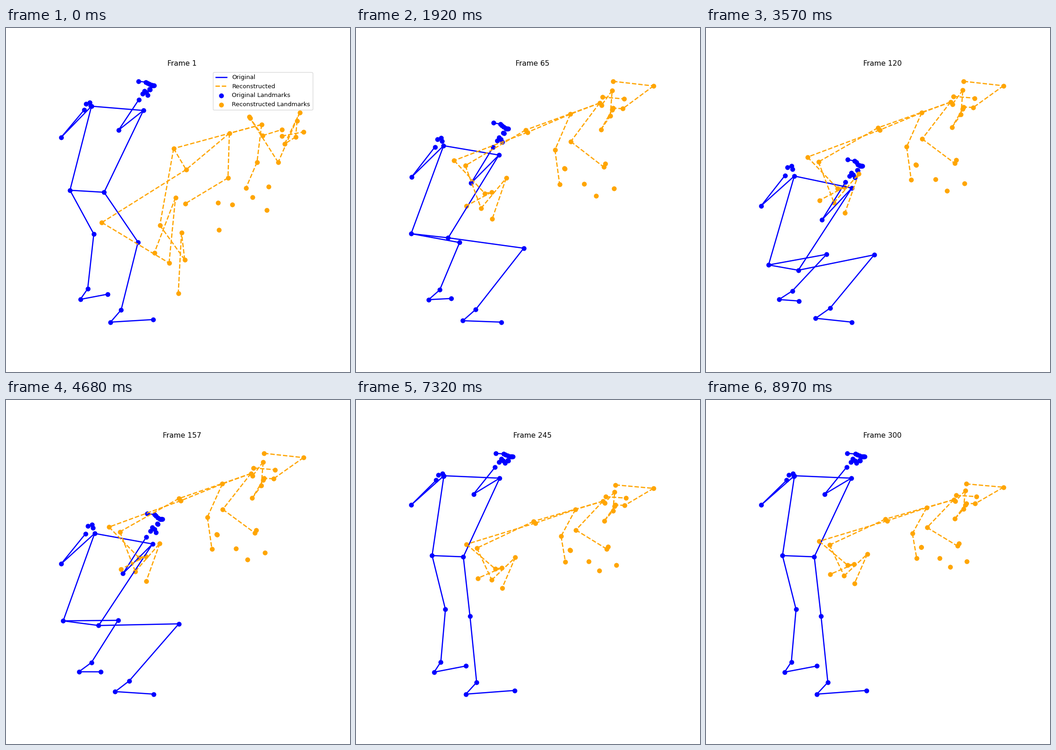
Animation, 748 px wide and 748 px high, one loop 9000 ms. Source, as a matplotlib script:

```python
import numpy as np
import matplotlib.pyplot as plt
from matplotlib.animation import FuncAnimation
from matplotlib.collections import LineCollection

FRAMES, STEP_MS = 300, 30
CENTER, ZOOM = np.array([340, 25]), 0.000714  # the blue figure slowly grows
SETTLE = 0.6                                  # rate at which orange calms down

# Squat depth over the loop: 0 upright, 1 lowest
TIMES = np.array([0, 64, 119, 156, 202, 244, 299])
DEPTH = np.array([0.19, 0.70, 1, 0.84, 0.385, 0, 0])

# Blue joints: upright, lowest
ARMS = {
    "shoulder_r": [(192, 80), (201, 306)], "shoulder_l": [(301, 86), (317, 331)],
    "elbow_r": [(128, 152), (134, 368)], "elbow_l": [(250, 125), (257, 397)],
    "wrist_r": [(177, 91), (182, 305)], "wrist_l": [(292, 59), (304, 319)],
    "hand_r": [(189, 75), (195, 285)], "hand_l": [(304, 39), (316, 299)],
}
LEGS = {
    "hip_r": [(169, 276), (149, 491)], "hip_l": [(230, 279), (209, 502)],
    "knee_r": [(195, 408), (266, 469)], "knee_l": [(243, 425), (362, 470)],
    "ankle_r": [(186, 537), (197, 545)], "ankle_l": [(256, 587), (273, 581)],
    "heel_r": [(173, 562), (170, 563)], "heel_l": [(235, 616), (244, 602)],
    "toe_r": [(235, 547), (210, 566)], "toe_l": [(330, 607), (317, 610)],
}
HEAD = {"ear": [(293, 25), (309, 272)], "nose": [(327, 33), (338, 285)]}
BODY = {**ARMS, **LEGS, **HEAD}

# Sideways swing of a joint halfway down; the arms all share one
SWING = {name: (4, 8) for name in ARMS}
SWING.update(hip_r=(-24, 0), hip_l=(-5, 0), knee_r=(-12, -7), knee_l=(48, 0))

# Small rigid parts: face points from ear to nose, fingers around a hand
FACE = np.array([(0, 0), (.47, .2), (.58, .45), (.7, .75), (.85, .95),
                 (1, 1), (.95, 1), (.9, 1), (.85, 1)])
MOUTH = np.array([(-9, 10), (-10, 9)])
FINGERS_R = np.array([(0, 0), (-8, 3), (2, 7)])
FINGERS_L = np.array([(0, 0), (-4, 7), (4, 4), (7, 10)])

# Orange pose once settled, and the loose one it starts from
SETTLED = np.array(
    [(560, 116), (647, 126), (581, 175), (560, 174), (558, 178),
     (534, 220), (554, 191), (558, 136), (535, 168)]                # face
    + [(537, 150), (584, 154)]                                      # mouth
    + [(531, 163), (469, 246), (540, 301)]                          # arm
    + [(372, 221), (242, 298), (276, 390), (330, 325), (300, 413)]  # leg
    + [(468, 187), (435, 264), (445, 338)]
    + [(376, 226), (218, 287), (284, 358), (299, 355), (244, 385)]
    + [(456, 305), (455, 304), (498, 337), (523, 363), (562, 347), (543, 294)], float)
LOOSE = np.array(
    [(633, 203), (630, 238), (606, 253), (639, 185), (592, 293),
     (531, 197), (529, 194), (558, 235), (600, 222)]
    + [(600, 236), (647, 227)]
    + [(556, 211), (546, 293), (522, 349)]
    + [(365, 263), (335, 430), (389, 505), (382, 446), (375, 578)]
    + [(486, 230), (483, 327), (390, 383)]
    + [(392, 309), (209, 424), (355, 512), (369, 370), (323, 490)]
    + [(461, 381), (463, 440), (492, 385), (536, 369), (567, 397), (571, 346)], float)
LOOSE = LOOSE * (0.979, 1.034) + (13.6, -49)


def chain(*ids):
    return list(zip(ids, ids[1:]))


# Order: face 0-8, mouth 9-10, right side 11-18, left side 19-26, fingers
EDGES = np.array(chain(*range(9)) + [(9, 10), (11, 19), (14, 22)]
                 + [e for s in (11, 19)
                    for e in chain(s, s + 1, s + 2) + chain(s, *range(s + 3, s + 8))])
LIMBS = [f"{joint}_{side}" for side in "rl"
         for joint in ("shoulder", "elbow", "wrist", "hip", "knee", "ankle", "heel", "toe")]

SLOPES = np.gradient(DEPTH, TIMES)
SLOPES[-2:] = 0


def depth(i):
    """Smooth curve through the depth keys."""
    k = min(np.searchsorted(TIMES, i, side="right") - 1, len(TIMES) - 2)
    h = TIMES[k + 1] - TIMES[k]
    u = (i - TIMES[k]) / h
    ease = u * u * (3 - 2 * u)
    return (DEPTH[k] + (DEPTH[k + 1] - DEPTH[k]) * ease
            + h * u * (1 - u) * ((1 - u) * SLOPES[k] - u * SLOPES[k + 1]))


def joint(name, d):
    up, low = np.array(BODY[name], float)
    return up + (low - up) * d + 4 * d * (1 - d) * np.array(SWING.get(name, (0, 0)))


def blue_pose(i):
    d = depth(i)
    ear, nose = joint("ear", d), joint("nose", d)
    pts = np.vstack([ear + FACE * (nose - ear), nose + MOUTH,
                     [joint(name, d) for name in LIMBS],
                     joint("hand_r", d) + FINGERS_R, joint("hand_l", d) + FINGERS_L])
    return CENTER + (pts - CENTER) * (1 + ZOOM * i)


def orange_pose(i):
    return SETTLED + (LOOSE - SETTLED) * SETTLE ** i


fig, ax = plt.subplots(figsize=(8, 8), dpi=93.5)
ax.axis("off")


def make_body(color, style, cap):
    bones = LineCollection([], colors=color, linewidths=2, linestyles=style,
                           capstyle=cap, zorder=2)
    ax.add_collection(bones, autolim=False)
    return bones, ax.scatter([], [], s=50, color=color, zorder=1)


blue = make_body("blue", "solid", "projecting")
orange = make_body("orange", "dashed", "butt")
legend = ax.legend([blue[0], orange[0], blue[1], orange[1]],
                   ["Original", "Reconstructed",
                    "Original Landmarks", "Reconstructed Landmarks"],
                   loc="upper right")


def draw(i):
    poses = blue_pose(i), orange_pose(i)
    for (bones, dots), pts in zip((blue, orange), poses):
        bones.set_segments(pts[EDGES])
        dots.set_offsets(pts)
    # Fit the view to both figures with a 5% margin
    every = np.vstack(poses)
    lo, hi = every.min(axis=0), every.max(axis=0)
    pad = 0.05 * (hi - lo)
    lo, hi = lo - pad, hi + pad
    ax.set_xlim(lo[0], hi[0])
    ax.set_ylim(hi[1], lo[1])
    ax.set_title(f"Frame {i + 1}")
    legend.set_visible(i == 0)
    return []


anim = FuncAnimation(fig, draw, frames=FRAMES, interval=STEP_MS,
                     repeat=True, repeat_delay=0)
plt.show()
```
